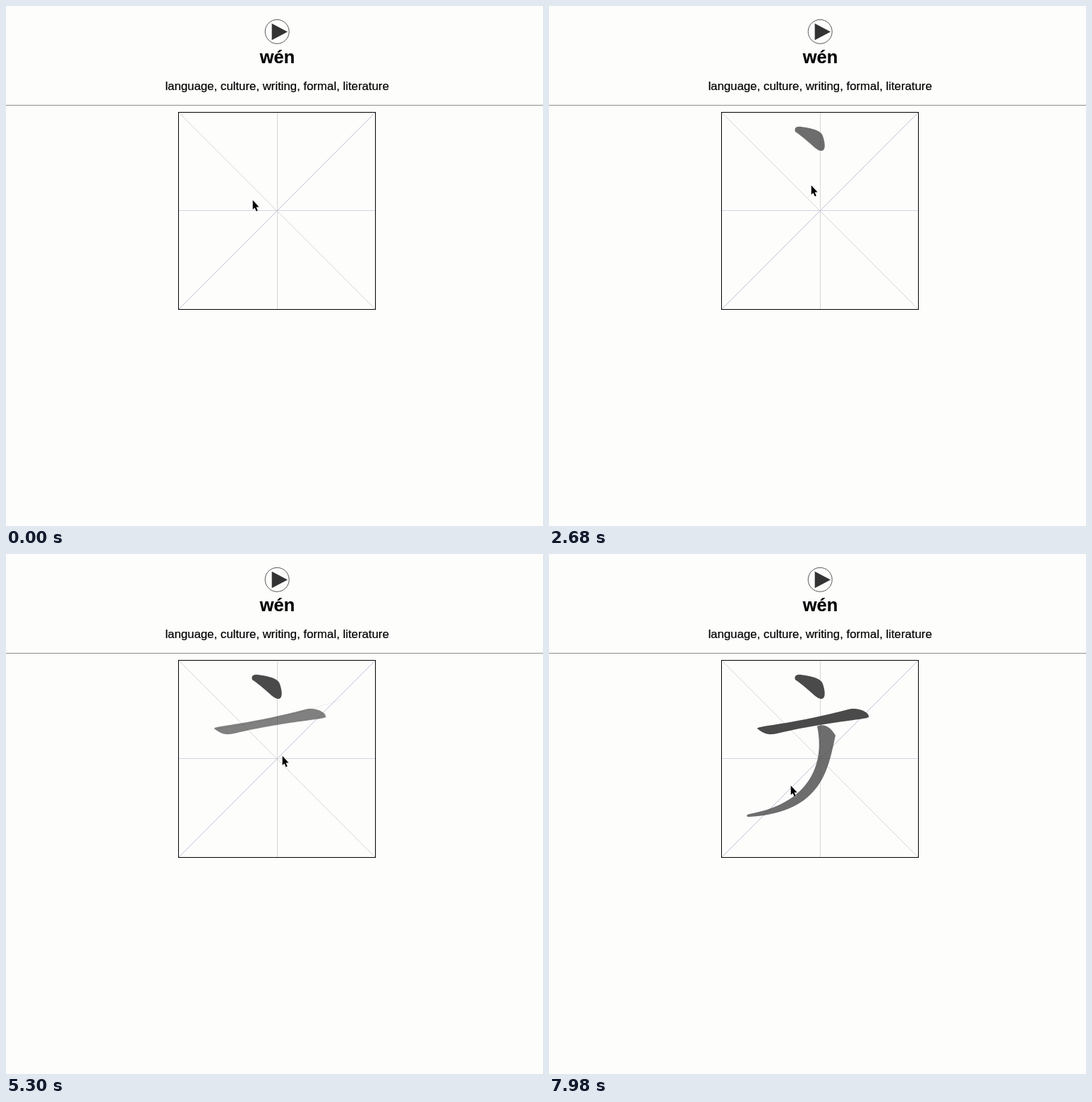
These frames come from a looping animation (761 px wide and 736 px high, 8000 ms). An HTML page:

```html
<!DOCTYPE html>
<html lang="en">
<head>
<meta charset="utf-8">
<title>Stroke practice</title>
<style>
  html, body { margin: 0; width: 100%; height: 100%; overflow: hidden; background: #fdfdfc; }
  svg { display: block; width: 761px; height: 736px; }
  text { font-family: "Liberation Sans", Arial, sans-serif; text-anchor: middle; stroke: #000; stroke-width: .2px; }
  .ink { fill: #4a4a4a; opacity: 0; }
  .trace { fill: none; stroke: #2c2c3a; stroke-width: 1.3; stroke-linejoin: round; }
</style>
</head>
<body>
<svg viewBox="0 0 761 736">
  <circle cx="384.200" cy="36.300" r="17" fill="none" stroke="#555"/>
  <path d="M376.700 24.700V48.300L399 36.500Z" fill="#333"/>
  <text x="384.500" y="81" font-size="25.400" font-weight="700">wén</text>
  <text x="384.200" y="119.300" font-size="16.800">language, culture, writing, formal, literature</text>
  <path d="M0 140.500H761" stroke="#8e8e8a"/>

  <path d="M384.500 151V429M245 151L523 429" stroke="#d6d6d0"/>
  <path d="M245 289.500H523" stroke="#d4d4e6"/>
  <path d="M245 429L523 151" stroke="#c2c2d6"/>
  <rect x="244.500" y="150.500" width="279" height="279" fill="none" stroke="#000"/>

  <path class="ink" d="M349 178C347 172 351 170 358 171C372 173 386 176 388 184C391 192 393 205 386 205C378 205 370 192 349 178Z"/>
  <path class="ink" d="M295 247C296 243 340 242 426 219.500C440 217 455 225 453 231C450 234 400 237 332 252C316 256 308 258 295 247Z"/>
  <path class="ink" d="M380 244C390 239 400 246 406 257C396 300 390 366 284 372C279 372 279 369 284 368C366 354 392 300 380 244Z"/>

  <path id="cursor" d="M.7 .8V14L3.500 11.400L5.700 16.400L7.800 15.500L5.600 10.500H9.600Z"
        stroke="#fff" paint-order="stroke"/>
</svg>
<script>
const LOOP = 8000, INK_FADE = 400, TRACE_FADE = 300, LAG = 60;

// Pointer moves in order; those with a release time also draw a stroke
const moves = [
  { start: 0, end: 1560, d: 'M349 274Q365 235 365 183' },
  { start: 1680, end: 2020, release: 2400, d: 'M365 183Q370 198 405 209.5' },
  { start: 2360, end: 2680, d: 'M405 209.5L371 253' },
  { start: 2680, end: 4080, d: 'M371 253C340 262 275 264 293 249' },
  { start: 4200, end: 4850, release: 5050, d: 'M293 249Q400 232 475 206' },
  { start: 5020, end: 5300, d: 'M475 206L391 285' },
  { start: 5300, end: 6200, d: 'M391 285C370 300 400 260 402 240' },
  { start: 6400, end: 7020, release: 7700, d: 'M402 240Q404 247 386 276Q340 365 268 373' },
  { start: 7500, end: 7980, d: 'M268 373Q300 370 342 327' }
];

const clamp = v => Math.min(1, Math.max(0, v));
const ease = v => 0.5 - Math.cos(Math.PI * clamp(v)) / 2;
const progress = (move, t) => clamp((t - move.start) / (move.end - move.start));

const svg = document.querySelector('svg');
const cursor = document.getElementById('cursor');
const inks = document.querySelectorAll('.ink');

for (const move of moves) {
  move.path = document.createElementNS(svg.namespaceURI, 'path');
  move.path.setAttribute('d', move.d);
  move.length = move.path.getTotalLength();
  if (move.release) {
    move.path.setAttribute('class', 'trace');
    svg.insertBefore(move.path, cursor);
  }
}
const strokes = moves.filter(move => move.release);

function draw(t) {
  const move = moves.filter(m => m.start <= t).pop();
  const along = progress(move, t);
  const { x, y } = move.path.getPointAtLength(move.length * (move.release ? along : ease(along)));
  cursor.setAttribute('transform', `translate(${x} ${y})`);

  strokes.forEach((stroke, i) => {
    const drawn = progress(stroke, t - LAG);
    const { style } = stroke.path;
    style.strokeDasharray = `${stroke.length * drawn} ${stroke.length + 1}`;
    style.opacity = drawn ? 1 - ease((t - stroke.release) / TRACE_FADE) : 0;
    inks[i].style.opacity = ease((t - stroke.release) / INK_FADE);
  });
}

const origin = performance.now();
function tick() {
  draw((performance.now() - origin) % LOOP);
  requestAnimationFrame(tick);
}
tick();
</script>
</body>
</html>
```
